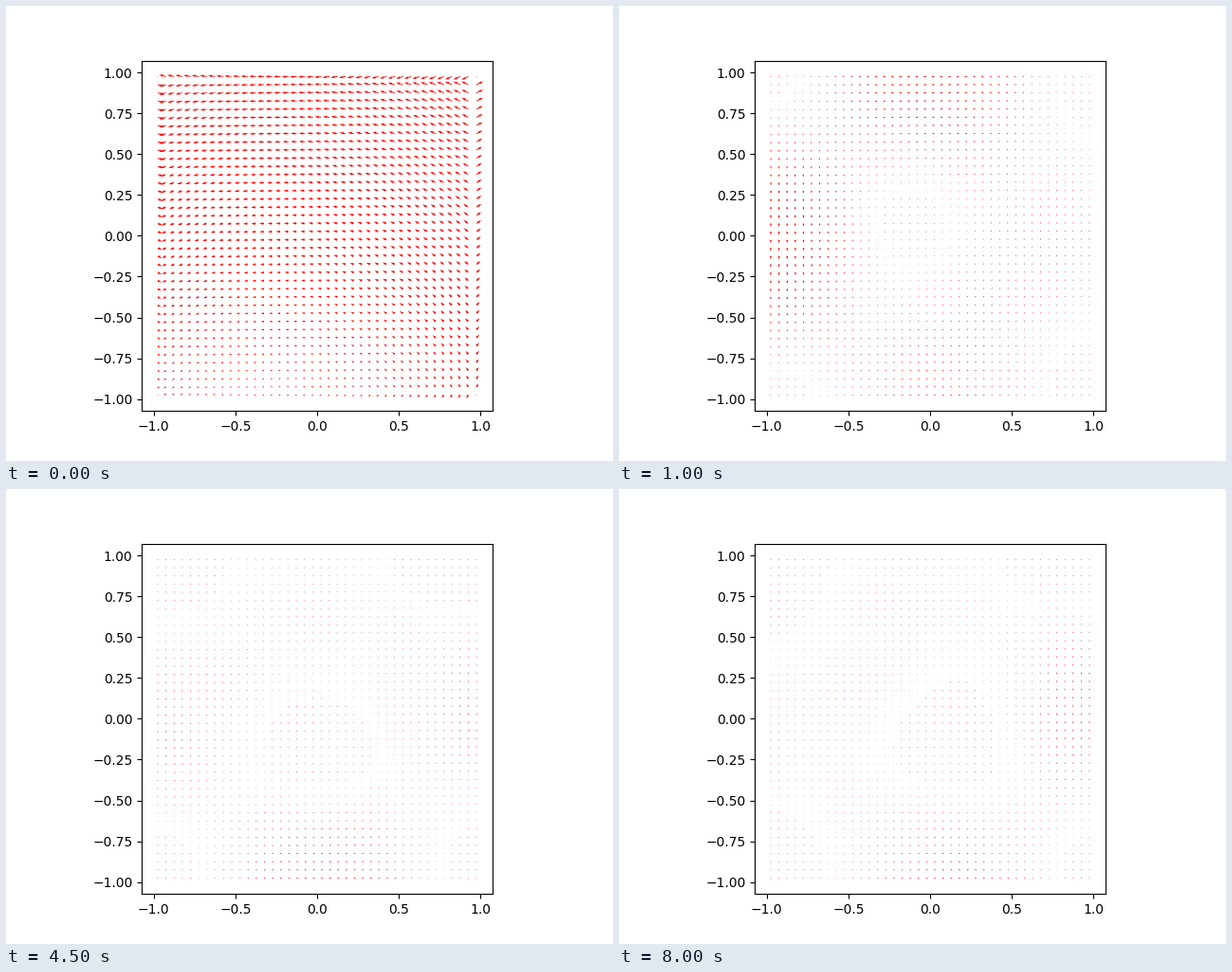
Recreate the animation shown at these times as a matplotlib script. Size 640 by 480 pixels, loop 8.05 s.

```python
import numpy as np
import matplotlib.pyplot as plt
from matplotlib.animation import FuncAnimation

FRAMES, STEP = 161, 50
N = 40
SETTLE = 0.4  # seconds until the initial stream has turned into a vortex

axis = np.linspace(-0.975, 0.975, N)
X, Y = np.meshgrid(axis, axis)


def vortex(t):
    """Swirl in a closed box; its stronger side drifts around ever more slowly."""
    t = max(t, SETTLE)
    fast = np.exp((SETTLE - t) / 0.5)
    swirl = 1.7 + 1.3 * np.exp((SETTLE - t) / 1.5)
    bias = 0.57 + 1.63 * fast
    angle = np.radians(82 + 78 * np.log(t / SETTLE))
    skew = 0.06 * t - 0.15 + 0.6 * fast
    mix = 1 - 0.7 * fast

    def profile(s, side):
        even = 1 - mix - mix * np.cos(np.pi * s)
        return swirl * np.sin(np.pi * s / 2) + bias * side * even

    u = -np.cos(np.pi * X / 2) * (1 - skew * X * Y) * profile(Y, np.sin(angle))
    v = np.cos(np.pi * Y / 2) * (1 + 0.4 * skew * X * Y) * profile(X, np.cos(angle))
    return u, v


def reflect(u, v):
    """Mirror the outermost cells at the walls."""
    for edge, inner in ((0, 1), (-1, -2)):
        u[:, edge], v[:, edge] = -u[:, inner], v[:, inner]
    for edge, inner in ((0, 1), (-1, -2)):
        u[edge], v[edge] = u[inner], -v[inner]
    for i in (0, -1):
        for j in (0, -1):
            u[i, j] = v[i, j] = 0


def field(t):
    """Velocity in pixels: a turning stream that gives way to the vortex."""
    u, v = vortex(t)
    w = max(0, 1 - t / SETTLE) ** 2
    u = (1 - w) * u - w * (4.7 + 2.7 * Y)
    v = (1 - w) * v + w * (0.8 + 2.9 * X)
    reflect(u, v)
    return u, v


fig, ax = plt.subplots(figsize=(6.4, 4.8), dpi=100)
ax.set_aspect("equal")
ax.set_xlim(-1.0725, 1.0725)
ax.set_ylim(-1.0725, 1.0725)
ax.set_xticks(np.arange(-1, 1.1, 0.5))
ax.set_yticks(np.arange(-1, 1.1, 0.25))
arrows = ax.quiver(X, Y, *field(0), color="red", width=0.0024,
                   scale_units="dots", scale=1)


def update(i):
    arrows.set_UVC(*field(i * STEP / 1000))
    return (arrows,)


anim = FuncAnimation(fig, update, frames=FRAMES, interval=STEP,
                     repeat=True, repeat_delay=0, blit=False)
plt.show()
```
